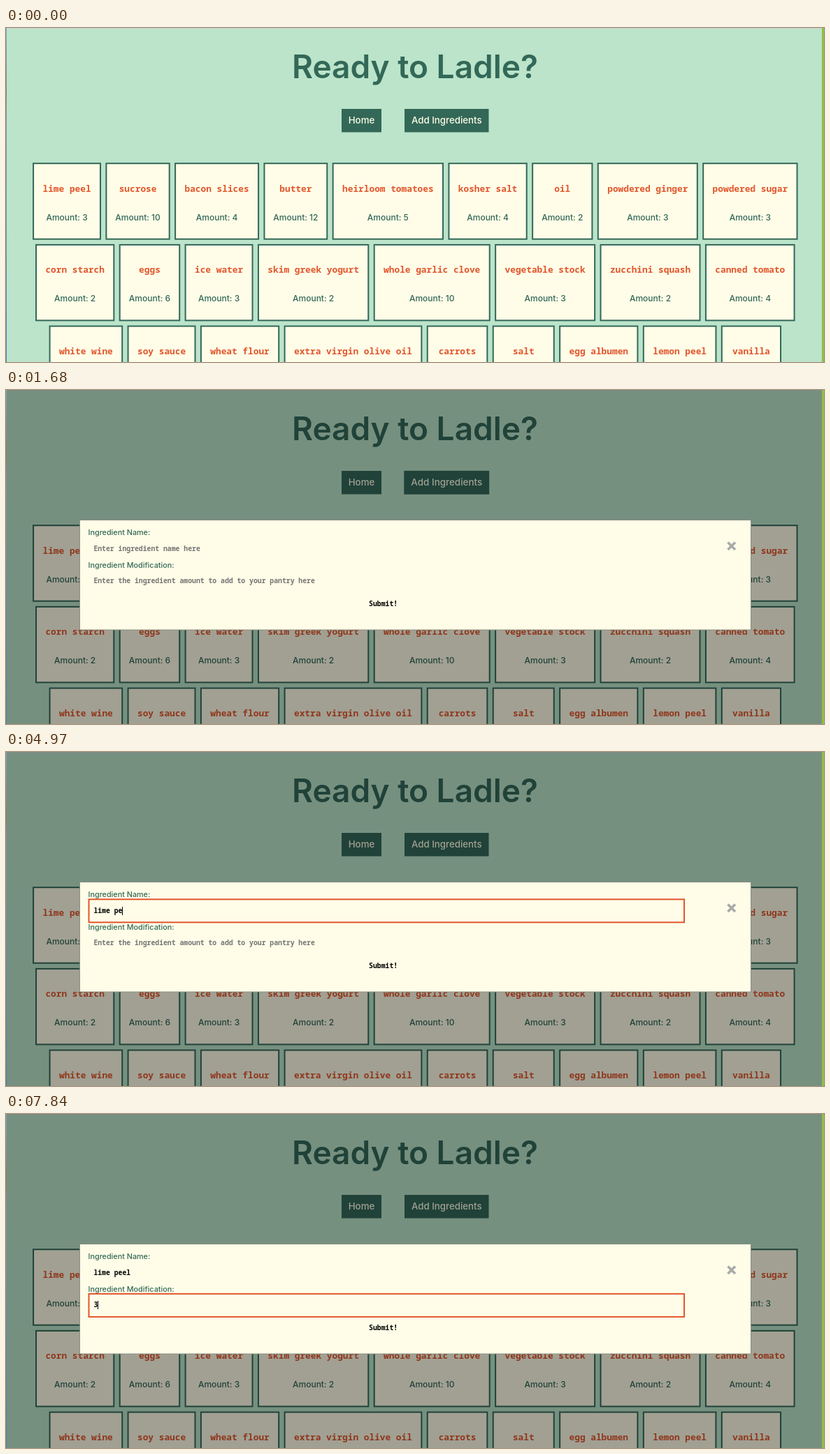
Recreate the animation shown at these times as an HTML page. Size 1170 by 479 pixels, loop 8000 ms.

```html
<!DOCTYPE html>
<html lang="en">
<head>
<meta charset="utf-8">
<title>Pantry</title>
<style>
  html, body { margin: 0; width: 100%; height: 100%; overflow: hidden; background: #bbe4ca; }
  svg { display: block; font: 500 12px Inter, sans-serif; fill: #336858; }
  .mid { text-anchor: middle; }
  .title { font-size: 46px; font-weight: 600; }
  .button { font-size: 13.3px; fill: #fffde8; }
  .card { fill: #fffde8; stroke: #336858; stroke-width: 2; }
  .name, .input { font-family: "Noto Sans Mono", monospace; font-weight: 700; white-space: pre; }
  .name { font-size: 12.8px; fill: #e2562b; }
  .input { font-size: 9.78px; fill: #000; }
  .hint { fill: #757575; font-weight: 600; }
  .label { font-size: 10.8px; }
  .focus { fill: none; stroke: #e2562b; stroke-width: 2; }
</style>
</head>
<body>
<svg width="1170" height="479" viewBox="0 0 1170 479">
  <defs>
    <linearGradient id="edge" x2="0" y2="1">
      <stop stop-color="#79a6cf"/>
      <stop offset=".19" stop-color="#8a7b6e"/>
      <stop offset=".3" stop-color="#7b95ad"/>
      <stop offset="1" stop-color="#4a7ab4"/>
    </linearGradient>
  </defs>
  <rect width="1170" height="479" fill="#bbe4ca"/>
  <rect width="1170" height="1" fill="#cfd3d0"/>
  <text class="mid title" x="585" y="72">Ready to Ladle?</text>
  <rect x="480" y="116" width="57" height="33.5"/>
  <text class="mid button" x="508.5" y="137.3">Home</text>
  <g id="add">
    <rect x="570" y="116" width="120.5" height="33.5"/>
    <text class="mid button" x="630.3" y="137.3">Add Ingredients</text>
  </g>
  <g id="cards"></g>
  <g id="modal">
    <rect width="1167" height="479" fill="#000" opacity=".37"/>
    <rect x="105.5" y="186.5" width="960" height="157.5" fill="#fffde8" stroke="#8b8f82"/>
    <path d="M1032.5 218.500l10.500 10.500m0-10.500l-10.500 10.500" stroke="#aaa" stroke-width="3.600"/>
    <text class="label" x="117.500" y="208">Ingredient Name:</text>
    <text class="label" x="117.500" y="254.500">Ingredient Modification:</text>
    <text class="input" id="field0" x="125.400" y="230.800"></text>
    <text class="input" id="field1" x="125.400" y="277.400"></text>
    <text class="input mid" x="539.600" y="310">Submit!</text>
    <rect class="focus" id="focus" x="118.500" width="851.500" height="33"/>
    <rect id="caret" width="1" height="12" fill="#000"/>
  </g>
  <rect width="1" height="479" fill="url(#edge)"/>
  <rect x="1167" width="3" height="479" fill="#8fbf45"/>
</svg>
<script>
const LOOP = 8000, CHAR = 5.87;
const $ = id => document.getElementById(id);

// Each card: name, amount, and the amount's width where it is the wider line
const rows = [
  [["lime peel", 3], ["sucrose", 10, 63.5], ["bacon slices", 4], ["butter", 12, 63], ["heirloom tomatoes", 5],
   ["kosher salt", 4], ["oil", 2, 58.5], ["powdered ginger", 3], ["powdered sugar", 3]],
  [["corn starch", 2], ["eggs", 6, 58.7], ["ice water", 3], ["skim greek yogurt", 2], ["whole garlic clove", 10],
   ["vegetable stock", 3], ["zucchini squash", 2], ["canned tomato", 4]],
  [["white wine", 4], ["soy sauce", 3], ["wheat flour", 2], ["extra virgin olive oil", 3], ["carrots", 2, 58.8],
   ["salt", 4, 60.2], ["egg albumen", 2], ["lemon peel", 3], ["vanilla", 1, 57.4]]
];
const GAP = 6.4;
const cardWidth = ([name, , amountWidth = 0]) => Math.max(name.length * 7.68, amountWidth) + 28.8;

$("cards").innerHTML = rows.map((row, i) => {
  const top = 193.2 + i * 116.7;
  const total = row.reduce((sum, card) => sum + cardWidth(card) + GAP, -GAP);
  let x = 585.3 - total / 2;
  return row.map(card => {
    const w = cardWidth(card), mid = x + w / 2;
    const svg = `<rect class="card" x="${x + 1}" y="${top + 1}" width="${w - 2}" height="108.5"/>
      <text class="mid name" x="${mid}" y="${top + 41.4}">${card[0]}</text>
      <text class="mid" x="${mid}" y="${top + 82.4}">Amount: ${card[1]}</text>`;
    x += w + GAP;
    return svg;
  }).join("");
}).join("");

const OPEN = 1680;
const fields = [
  { text: "lime peel", hint: "Enter ingredient name here", focus: 2730,
    keys: [3570, 3780, 4060, 4200, 4550, 4830, 4970, 5110, 5250] },
  { text: "3", hint: "Enter the ingredient amount to add to your pantry here", focus: 6440, keys: [7840] }
];
const caretOff = [[3220, 3570], [5810, 6370], [6930, 7420]];

const clamp = v => Math.min(1, Math.max(0, v));
const show = (el, on) => el.setAttribute("visibility", on ? "visible" : "hidden");

function drawButton(t) {
  const hover = t < OPEN ? clamp((t - 1120) / 210) : 0;
  const scale = 1 + (t < OPEN ? .1 * hover : .012 * clamp((1820 - t) / 140));
  const add = $("add");
  add.setAttribute("transform", `translate(630.25 132.75) scale(${scale}) translate(-630.25 -132.75)`);
  add.style.filter = hover ? `drop-shadow(0 ${4.5 * hover}px 4px rgba(0,0,0,${.65 * hover}))` : "none";
}

function drawModal(t) {
  const open = t >= OPEN;
  const active = t >= fields[1].focus ? 1 : t >= fields[0].focus ? 0 : -1;
  $("modal").style.display = open ? "" : "none";
  show($("focus"), active >= 0);
  show($("caret"), active >= 0 && !caretOff.some(([from, to]) => t >= from && t < to));
  fields.forEach(({ text, hint, keys }, i) => {
    const typed = keys.filter(key => t >= key).length;
    const el = $("field" + i);
    el.textContent = typed ? text.slice(0, typed) : hint;
    el.classList.toggle("hint", !typed);
    if (i === active) {
      $("focus").setAttribute("y", 211.3 + i * 46.6);
      $("caret").setAttribute("x", Math.round(125.4 + typed * CHAR));
      $("caret").setAttribute("y", 222 + i * 46);
    }
  });
}

function frame(now) {
  const t = now % LOOP;
  drawButton(t);
  drawModal(t);
  requestAnimationFrame(frame);
}
frame(0);
</script>
</body>
</html>
```
